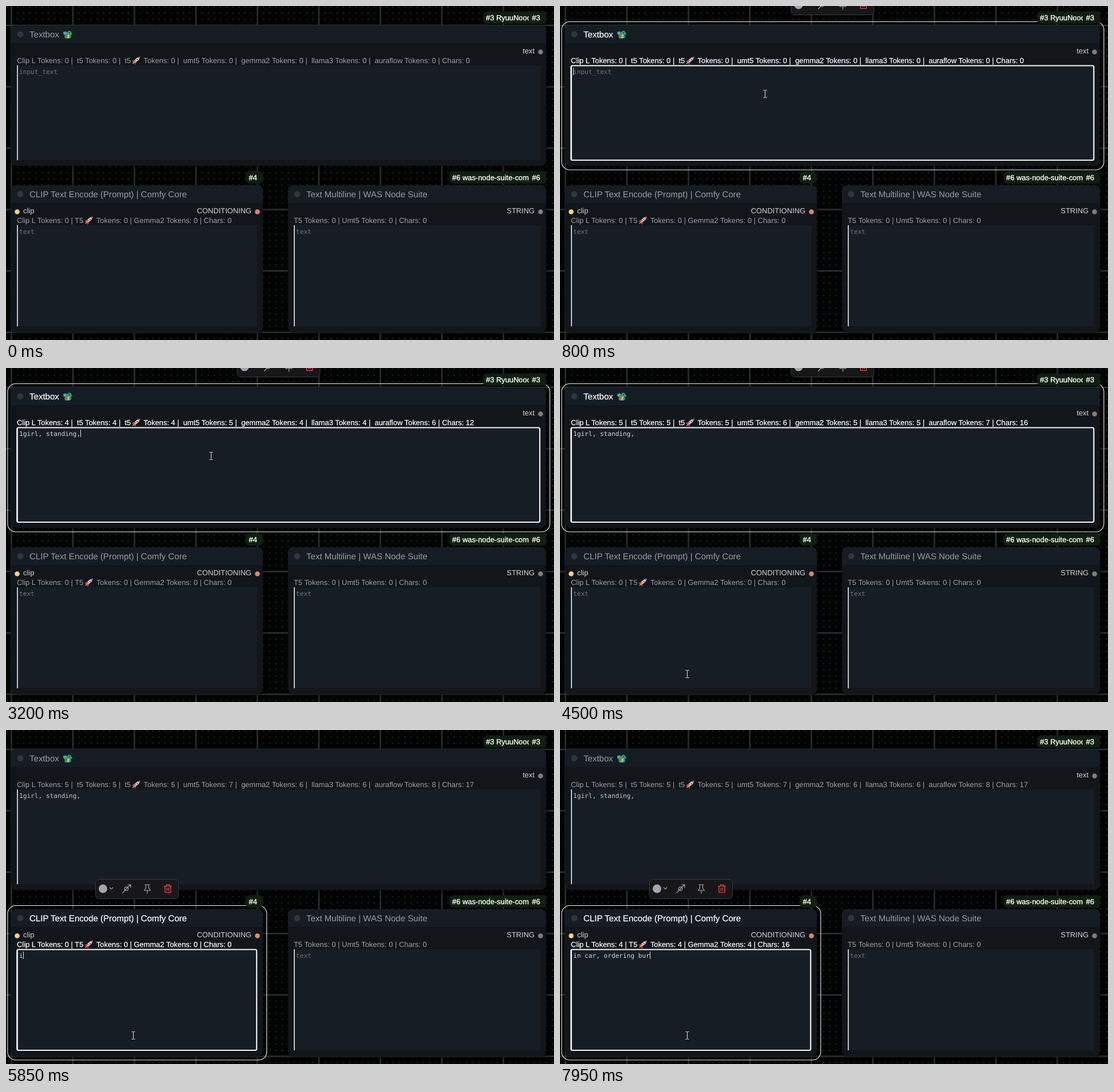
Animation, 958 px wide and 585 px high, one loop 8000 ms. Source, as an HTML page:

```html
<!DOCTYPE html>
<html lang="en">
<head>
<meta charset="utf-8">
<title>Token counter nodes</title>
<style>
  html, body { margin: 0; width: 100%; height: 100%; overflow: hidden; background: #020303; }
  svg { display: block; width: 100vw; height: 100vh; }
  text { white-space: pre; text-rendering: geometricPrecision; font: 12.9px "Liberation Sans", Arial, sans-serif; fill: #9c9fa2; }
  .title { font-size: 15.05px; fill: #999c9f; }
  .slot { fill: #d2d4d6; }
  .end { text-anchor: end; }
  .badge rect { fill: #0f1f10; }
  .badge text { fill: #fff; stroke: #fff; stroke-width: .35px; }
  .mono { font: 11.14px "DejaVu Sans Mono", monospace; fill: #c0c5c9; }
  .placeholder { fill: #70757a; }
  .focus { display: none; fill: none; stroke: #f4f4f4; }
  .focused .focus { display: inline; }
  .focused .title, .focused .info { fill: #f8f9fa; stroke: #f8f9fa; stroke-width: .25px; }
  .focused .mono:not(.placeholder) { fill: #d0d8dd; }
  .tool { fill: none; stroke: #a6a6ae; stroke-width: 1.2; stroke-linecap: round; stroke-linejoin: round; }
</style>
</head>
<body>
<svg viewBox="0 0 958 585" preserveAspectRatio="none">
  <defs>
    <pattern id="dots" x="4.1" y="28.6" width="10.75" height="10.75" patternUnits="userSpaceOnUse">
      <rect x="4.4" y="4.4" width="2" height="2" fill="#262d2f"/>
    </pattern>
    <pattern id="lines" x="9.5" y="34" width="107.5" height="107.5" patternUnits="userSpaceOnUse">
      <path d="M0 0H107.5V107.5H0Z" fill="none" stroke="#2a3133" stroke-width="2.4"/>
    </pattern>
    <filter id="shadow" x="-5%" y="-5%" width="110%" height="110%" color-interpolation-filters="sRGB">
      <feDropShadow dx="2" dy="2" stdDeviation="2" flood-color="#000" flood-opacity=".5"/>
    </filter>
    <g id="rocket">
      <path d="M4 7 1 9l3 .5M8 11l-2 3.500-.8-3" fill="#d8344a" stroke="#d8344a"/>
      <path d="M3.500 9.500 1 14l4.500-2.500Z" fill="#f7a13b"/>
      <path d="M15 1Q9 1 3.500 9l2.300 2.300Q14 7 15 1Z" fill="#d3d8dd"/>
      <path d="M15 1 10.600 2l3 3Z" fill="#e2405a"/>
      <circle cx="10" cy="6" r="1.500" fill="#4a86b8"/>
      <path d="M4 9.500 7.500 7" stroke="#c63450" stroke-width="1.500"/>
    </g>
    <g id="dragon">
      <path d="M1 4 5 2l3 2 3-3 3 1 3 5-3 2 1 4-3 2H5l-2-3 2-2-4-3Z" fill="#26a07e"/>
      <path d="M1 3 3 8 7 5Z" fill="#3fb5b4"/>
      <path d="M3 9 7 6l1 4-3 2Z" fill="#c94f5c"/>
      <path d="M9 8h3l-1 6H8Z" fill="#dcbf4c"/>
      <path d="M13 6h4l-2 2Z" fill="#d9504f"/>
      <circle cx="12" cy="4.500" r=".9" fill="#1b2226"/>
    </g>
  </defs>
  <rect width="958" height="585" fill="url(#dots)"/>
  <rect width="958" height="585" fill="url(#lines)"/>
  <g id="nodes"></g>
  <g id="toolbox">
    <rect x="156.500" y="261.500" width="145" height="34" rx="6" fill="#171719" stroke="#393a3e"/>
    <circle cx="169.500" cy="278" r="7.500" fill="#a4a4ae"/>
    <g class="tool">
      <path d="m181.500 276 2.700 2.700 2.700-2.700"/>
      <path d="M204 285l4-4M213 275l5-4M213 271h5v5"/><circle cx="210.500" cy="278" r="3.200"/><path d="m209 280 3-3.500"/>
      <path d="M243 271h8M244.500 271v6l-3 4h11l-3-4v-6M247 281v5"/>
      <path stroke="#ef5350" d="M276.500 273.500h13M280.500 273.500v-2.500h5v2.500M278 273.500v11h10v-11M281.500 276.500v5M284.500 276.500v5"/>
    </g>
  </g>
  <path id="beam" fill="none" stroke="#e8e8e8" d="M-3 -6.500H-1Q0 -6.500 0 -5.500V5.500Q0 6.500 -1 6.500H-3M3 -6.500H1Q0 -6.500 0 -5.500M3 6.500H1Q0 6.500 0 5.500"/>
  <path id="arrow" fill="#fff" stroke="#000" stroke-width=".8" d="M0 0V16l3.700-3.500 2.500 5.500 2.500-1-2.500-5.500H11.500Z"/>
</svg>
<script>
const $ = id => document.getElementById(id);
const LOOP = 8000, STEP = 50, CHAR = 6.7;

const badge = (right, top, id, label, left) => `<g class="badge">
  <rect x="${left}" y="${top}" width="${right - left}" height="21.500" rx="7"/>
  ${label ? `<text x="${left + 5}" y="${top + 15}">${id} ${label}</text>` : ''}
  <rect x="${right - 30}" y="${top}" width="30" height="21.500" rx="${label ? 2 : 7}"/>
  <text x="${right - 24.5}" y="${top + 15}">${id}</text></g>`;

const slot = (x, y, color) => `<circle cx="${x}" cy="${y}" r="4.300" fill="${color}"/>`;

function node(n) {
  const { x, y, right, bottom, area } = n, w = right - x, left = x + 10, aw = right - 10 - left;
  return `<g id="${n.key}">
    <g filter="url(#shadow)"><rect x="${x}" y="${y}" width="${w}" height="${bottom - y}" rx="8.600" fill="#12161a"/></g>
    <path d="M${x} ${y + 32}v-23.400q0-8.600 8.600-8.600H${right - 8.6}q8.600 0 8.600 8.600v23.400Z" fill="#161c24"/>
    <path d="M${x} ${y + 32}H${right}" stroke="#0d1013"/>
    <rect class="focus" x="${x - 6.1}" y="${y - 6.45}" width="${w + 12.9}" height="${bottom - y + 13.4}" rx="14" stroke-width="1.100"/>
    ${badge(right, y - 24.5, n.id, n.pack, n.badgeLeft)}
    <circle cx="${x + 16}" cy="${y + 15.500}" r="5.400" fill="#31363c"/>
    <text class="title" x="${x + 32}" y="${y + 21}">${n.title}</text>
    <text class="slot end" x="${right - 20}" y="${y + 49}">${n.out}</text>
    ${slot(right - 9.5, y + 46.5, n.outColor)}${n.extra || ''}
    <text class="info head" x="${left}" y="${area - 4.5}"></text>
    <text class="info tail" x="${n.tail || 0}" y="${area - 4.5}"></text>
    ${n.tail ? `<use href="#rocket" x="${n.tail - 21}" y="${area - 16}"/>` : ''}
    <rect x="${left}" y="${area}" width="${aw}" height="${bottom - 10 - area}" fill="#161d24"/>
    <path d="M${left + 1} ${area}V${bottom - 10}" stroke="#c3c5c7" stroke-width="2"/>
    <rect class="focus" x="${left + .2}" y="${area + .5}" width="${aw - 1}" height="${bottom - 10.5 - area}" rx="2.500" stroke-width="2.150"/>
    <text class="mono placeholder" x="${left + 4}" y="${area + 14.5}">${n.hint}</text>
    <text class="mono typed" x="${left + 4}" y="${area + 14.5}"></text>
    <rect class="caret" y="${area + 4}" width="1" height="13" fill="#e4e6e8"/>
  </g>`;
}

const nodes = [
  { key: 'box', x: 9, y: 34, right: 944, bottom: 280, area: 104, id: '#3', pack: 'RyuuNood', badgeLeft: 834,
    title: 'Textbox', out: 'text', outColor: '#7e7e7e', hint: 'input_text', tail: 240.6,
    extra: '<use href="#dragon" x="99" y="42"/>',
    names: ['Clip L', '|  t5', '|  t5', '|  umt5', '|  gemma2', '|  llama3', '|  auraflow'], split: 2,
    focus: [800, 4600], text: '1girl, standing, ',
    keys: [1300, 1500, 1550, 1650, 1800, 2050, 2150, 2200, 2350, 2450, 2550, 2600, 2700, 2850, 3000, 3200, 3750],
    counts: [[0, '00000000'], [1700, '23333223'], [2400, '44454468'], [2750, '444544612'],
      [3650, '555655716'], [4750, '555766817']] },
  { key: 'clip', x: 9, y: 314, right: 449, bottom: 571, area: 384, id: '#4', badgeLeft: 419,
    title: 'CLIP Text Encode (Prompt) | Comfy Core', out: 'CONDITIONING', outColor: '#d48a70', hint: 'text', tail: 157.9,
    extra: slot(19.5, 360.5, '#fbd283') + '<text class="slot" x="30" y="363">clip</text>',
    names: ['Clip L', '| T5', '| Gemma2'], split: 1,
    focus: [4600, LOOP], text: 'in car, ordering bur',
    keys: [5850, 5950, 6050, 6100, 6200, 6400, 6600, 6650, 6800, 6900, 7050,
      7200, 7250, 7350, 7400, 7500, 7650, 7800, 7900, 7950],
    counts: [[0, '0000'], [6650, '3337'], [7700, '44416']] },
  { key: 'multi', x: 493, y: 314, right: 944, bottom: 571, area: 384, id: '#6', pack: 'was-node-suite-com', badgeLeft: 775,
    title: 'Text Multiline | WAS Node Suite', out: 'STRING', outColor: '#7e7e7e', hint: 'text',
    names: ['T5', '| Umt5'], split: 9, focus: [LOOP, LOOP], text: '', keys: [], counts: [[0, '000']] }
];

// One digit per tokenizer; the remaining digits are the character count.
function infoParts({ names, split }, digits) {
  const count = i => ` Tokens: ${digits[i]} `;
  let head = '', tail = '';
  names.forEach((name, i) => {
    if (i < split) head += name + count(i);
    else if (i === split) { head += name; tail = count(i).trimStart(); }
    else tail += name + count(i);
  });
  const chars = `| Chars: ${digits.slice(names.length)}`;
  return tail ? [head, tail + chars] : [head + chars, ''];
}

function drawNode(n, t) {
  const g = $(n.key), part = name => g.querySelector('.' + name);
  const focused = t >= n.focus[0] && t < n.focus[1];
  const typed = n.keys.filter(k => k <= t);
  const since = t - Math.max(n.focus[0], ...typed);
  const [head, tail] = infoParts(n, n.counts.filter(c => c[0] <= t).pop()[1]);
  g.classList.toggle('focused', focused);
  part('head').textContent = head;
  part('tail').textContent = tail;
  part('typed').textContent = n.text.slice(0, typed.length);
  part('placeholder').style.display = typed.length ? 'none' : '';
  part('caret').setAttribute('x', Math.round(n.x + 14 + typed.length * CHAR));
  part('caret').style.display = focused && Math.floor(since / 500) % 2 === 0 ? '' : 'none';
}

function pointer(t) {
  const mix = (a, b, p) => a.map((v, i) => v + (b[i] - v) * p);
  const start = [924, 367], first = [358, 154], second = [222, 536];
  if (t < 4100) return mix(start, first, 1 - (1 - Math.min(1, (t - 450) / 200)) ** 2);
  if (t >= 4550) return [222, 535];
  const p = (t - 4050) / 450;
  return mix(first, second, p * p * (3 - 2 * p));
}

function drawPointer(t) {
  const [x, y] = pointer(t).map(Math.round);
  const overText = nodes.some(n => x > n.x + 10 && x < n.right - 10 && y > n.area && y < n.bottom - 10);
  for (const [id, shown] of [['beam', overText], ['arrow', !overText]]) {
    $(id).style.display = t >= 450 && shown ? '' : 'none';
    $(id).setAttribute('transform', `translate(${x + .5} ${y})`);
  }
}

function frame(now) {
  const t = Math.floor((now - begin) % LOOP / STEP) * STEP;
  if (t !== shownAt) {
    shownAt = t;
    nodes.forEach(n => drawNode(n, t));
    drawPointer(t);
    $('toolbox').style.display = t < 800 ? 'none' : '';
    $('toolbox').setAttribute('transform', t < 4600 ? 'translate(247.500 -280)' : '');
  }
  requestAnimationFrame(frame);
}

$('nodes').innerHTML = nodes.map(node).join('');
let shownAt = -1;
const begin = performance.now();
frame(begin);
</script>
</body>
</html>
```
